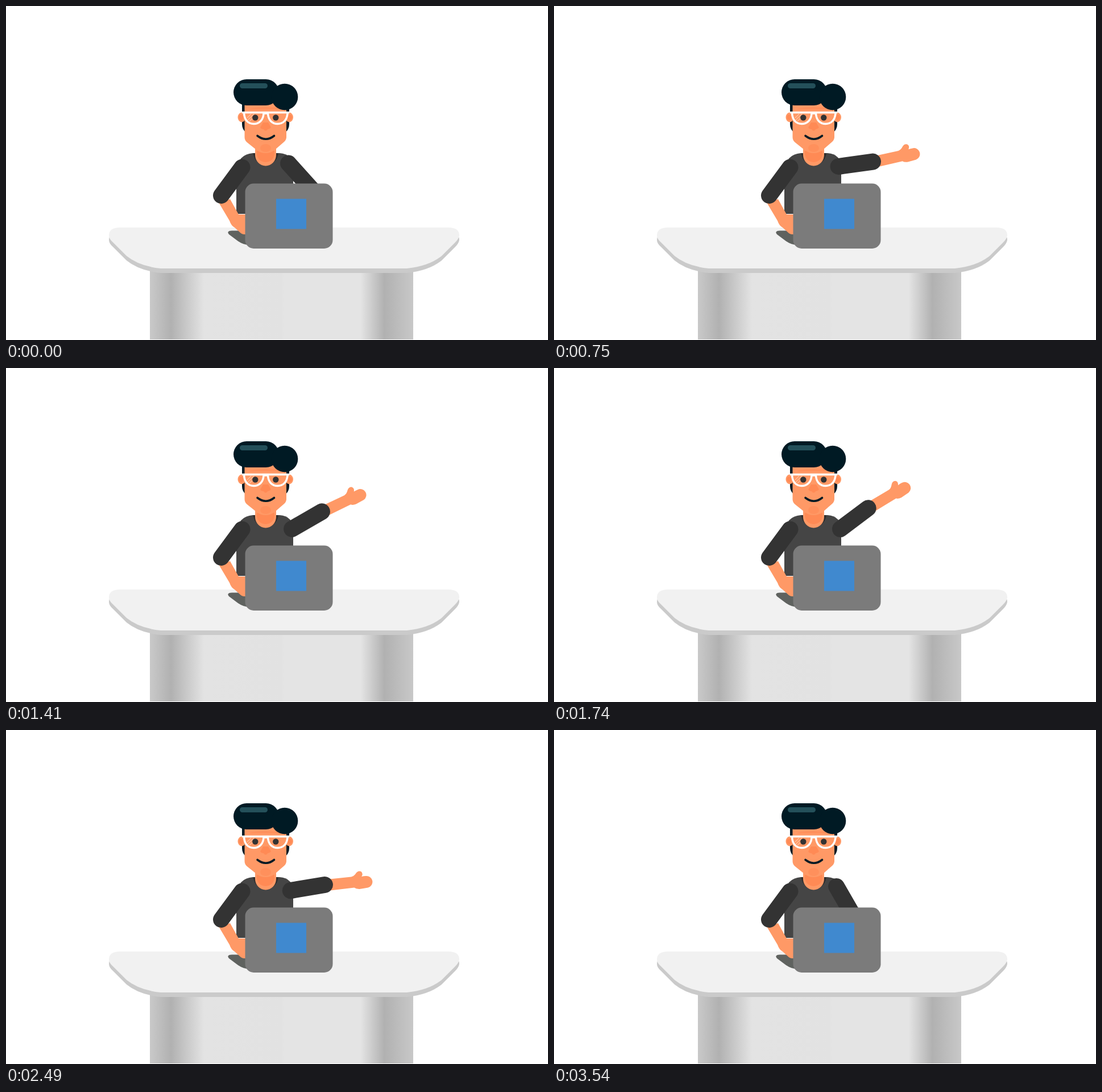
An HTML page for the animation above (3.93 s loop, 953 by 588 pixels).

```html
<!DOCTYPE html>
<html lang="en">
<head>
<meta charset="utf-8">
<title>Reception desk</title>
<style>
  html, body { margin: 0; width: 100%; height: 100%; overflow: hidden; background: #fff; }
  svg { display: block; width: 953px; height: 588px; }
  .skin { fill: #ff9966; }
  .shade { fill: #ff8a55; }
  .hair { fill: #001a24; }
  .sleeve { stroke: #333; stroke-width: 29; stroke-linecap: round; }
</style>
</head>
<body>
<svg viewBox="0 0 953 588">
  <defs>
    <linearGradient id="metal">
      <stop offset="0" stop-color="#c9c9c9"/>
      <stop offset=".08" stop-color="#b1b1b1"/>
      <stop offset=".205" stop-color="#e3e3e3"/>
      <stop offset=".5" stop-color="#e2e2e2"/>
      <stop offset=".51" stop-color="#e4e4e4"/>
      <stop offset=".8" stop-color="#e4e4e4"/>
      <stop offset=".89" stop-color="#b1b1b1"/>
      <stop offset="1" stop-color="#c8c8c8"/>
    </linearGradient>
    <path id="top" d="M200 390H778Q797 390 797 404Q796 410 790 416L766 440Q744 458 705 462H272Q234 458 212 440L188 416Q181 410 181 404Q181 390 200 390Z"/>
  </defs>

  <g id="desk">
    <rect x="253" y="464" width="463" height="123" fill="url(#metal)"/>
    <use href="#top" y="8" fill="#cacaca"/>
    <use href="#top" fill="#f1f1f1"/>
    <path d="M392 402Q387 396 397 395.5H412L430 402V421Q418 421 408 414Z" fill="#5f625f"/>
  </g>

  <g id="body">
    <path d="M405 366V290Q408 261 434 259H481Q505 260 505 287V366Z" fill="#454545"/>
    <path d="M434.500 259A22.500 25.500 0 0 0 479 259Z" fill="#2e2e2e"/>
    <path class="skin" d="M438 248H475V262A18.500 19.500 0 0 1 438 262Z"/>
    <path class="shade" d="M441 255H472V261Q470 274 456.500 275Q443 274 441 261Z"/>
    <path class="skin" d="M374 346L393 378Q396 387 402 390L413 400Q417 403 426 402V367H409L394 340Z"/>
    <path class="sleeve" d="M415 284L378.500 333.500"/>
  </g>

  <g id="arm">
    <path id="fore" class="skin" d="M0 -9L48 -8.500Q53 -9 57 -14Q61 -18.500 66 -16Q70 -12 66 -7Q70 -7.500 73.500 -7.200A10.500 10.500 0 0 1 75 13.700Q68 14 60 14.500Q54 14 51 11L0 11Z"/>
    <path id="upper" class="sleeve" d="M-4.200 5.500h61"/>
  </g>

  <g id="head">
    <path class="hair" d="M415 165H498V208Q498 216 492 222H421Q415 216 415 208Z"/>
    <ellipse class="skin" cx="414.500" cy="196" rx="7" ry="8.500"/>
    <ellipse class="skin" cx="498" cy="196" rx="7" ry="8.500"/>
    <ellipse class="shade" cx="413.500" cy="196" rx="4" ry="5"/>
    <ellipse class="shade" cx="499" cy="196" rx="4" ry="5"/>
    <path class="skin" d="M419.500 166H493V231Q493 236 488 240L473 253Q466 259 456.500 259Q447 259 440 253L425 241Q419.500 237 419.500 231Z"/>
    <ellipse class="shade" cx="456.500" cy="250" rx="9.500" ry="7" opacity=".6"/>
    <path class="shade" d="M428 181Q448 176 480 179V182H428Z" opacity=".6"/>
    <path class="shade" d="M452 205H461L466 214Q463 217 460 217Q456.500 222 453 217Q449 217 447 214Z"/>
    <rect class="hair" x="400" y="129" width="80" height="46" rx="23"/>
    <circle class="hair" cx="490" cy="160" r="23.300"/>
    <rect x="411" y="136" width="49" height="9" rx="4.500" fill="#24505a"/>
    <path d="M424 197l7 -7M425 201l11 -11M428 203l5 -5" stroke="#ffc3a3" stroke-width="1.300"/>
    <g fill="#333">
      <circle cx="438.300" cy="196.500" r="5.200"/>
      <circle cx="474.300" cy="196.500" r="5.200"/>
    </g>
    <g fill="none" stroke="#fff" stroke-width="3.500">
      <path d="M415 187.500H498"/>
      <path d="M418.500 188C419 201 426 207.500 435.500 207.500S452.500 201 453 189H460.500C461 201 468 207.500 477.500 207.500S494.500 201 495 188"/>
    </g>
    <path d="M442 228.500Q457 240 471.500 228.500" fill="none" stroke="#001a24" stroke-width="3.600" stroke-linecap="round"/>
  </g>

  <g id="laptop">
    <rect x="420.500" y="312.500" width="154" height="114.500" rx="15" fill="#7b7b7b"/>
    <rect x="475" y="339.500" width="53" height="53" fill="#4089cf"/>
  </g>
</svg>
<script>
const LOOP = 3930, STEP = 30, REST = 3540;
const SHOULDER = [503.5, 276.5], ELBOW = [56.8, 5.5];

// time, upper arm angle, forearm angle
const POSES = [
  [0, 48, 85], [225, 32.5, 66], [450, 14, 9.5], [780, -10, -15],
  [1110, -31, -34], [1400, -30, -26], [1740, -37, -31.3], [2160, -29, -30],
  [2490, -9.6, -6.5], [2850, 9.6, 34.5], [3050, 24, 68], [3240, 41, 84], [REST, 60, 92]
];

const slope = (i, k) => POSES[i] && POSES[i + 1]
  ? (POSES[i + 1][k] - POSES[i][k]) / (POSES[i + 1][0] - POSES[i][0]) : null;

// Tangents that never overshoot a pose
function tangent(i, k) {
  const a = slope(i - 1, k), b = slope(i, k);
  if (a === null) return b;
  if (b === null) return a;
  return a * b > 0 ? 2 * a * b / (a + b) : 0;
}

function angleAt(t, k) {
  let i = 0;
  while (i < POSES.length - 2 && t >= POSES[i + 1][0]) i++;
  const p = POSES[i], q = POSES[i + 1], d = q[0] - p[0], u = (t - p[0]) / d;
  const s = u * u * (3 - 2 * u);
  return p[k] + (q[k] - p[k]) * s
    + d * u * (1 - u) * ((1 - u) * tangent(i, k) - u * tangent(i + 1, k));
}

const upper = document.getElementById("upper");
const fore = document.getElementById("fore");

function place(el, x, y, angle) {
  el.setAttribute("transform", `translate(${x} ${y}) rotate(${angle})`);
}

function draw(now) {
  const t = Math.min(REST, Math.floor(now % LOOP / STEP) * STEP);
  const a = angleAt(t, 1), r = a * Math.PI / 180;
  const [sx, sy] = SHOULDER, [ex, ey] = ELBOW;
  place(upper, sx, sy, a);
  place(fore,
    sx + ex * Math.cos(r) - ey * Math.sin(r),
    sy + ex * Math.sin(r) + ey * Math.cos(r),
    angleAt(t, 2));
}

const start = performance.now();
function tick() {
  draw(performance.now() - start);
  requestAnimationFrame(tick);
}
tick();
</script>
</body>
</html>
```
